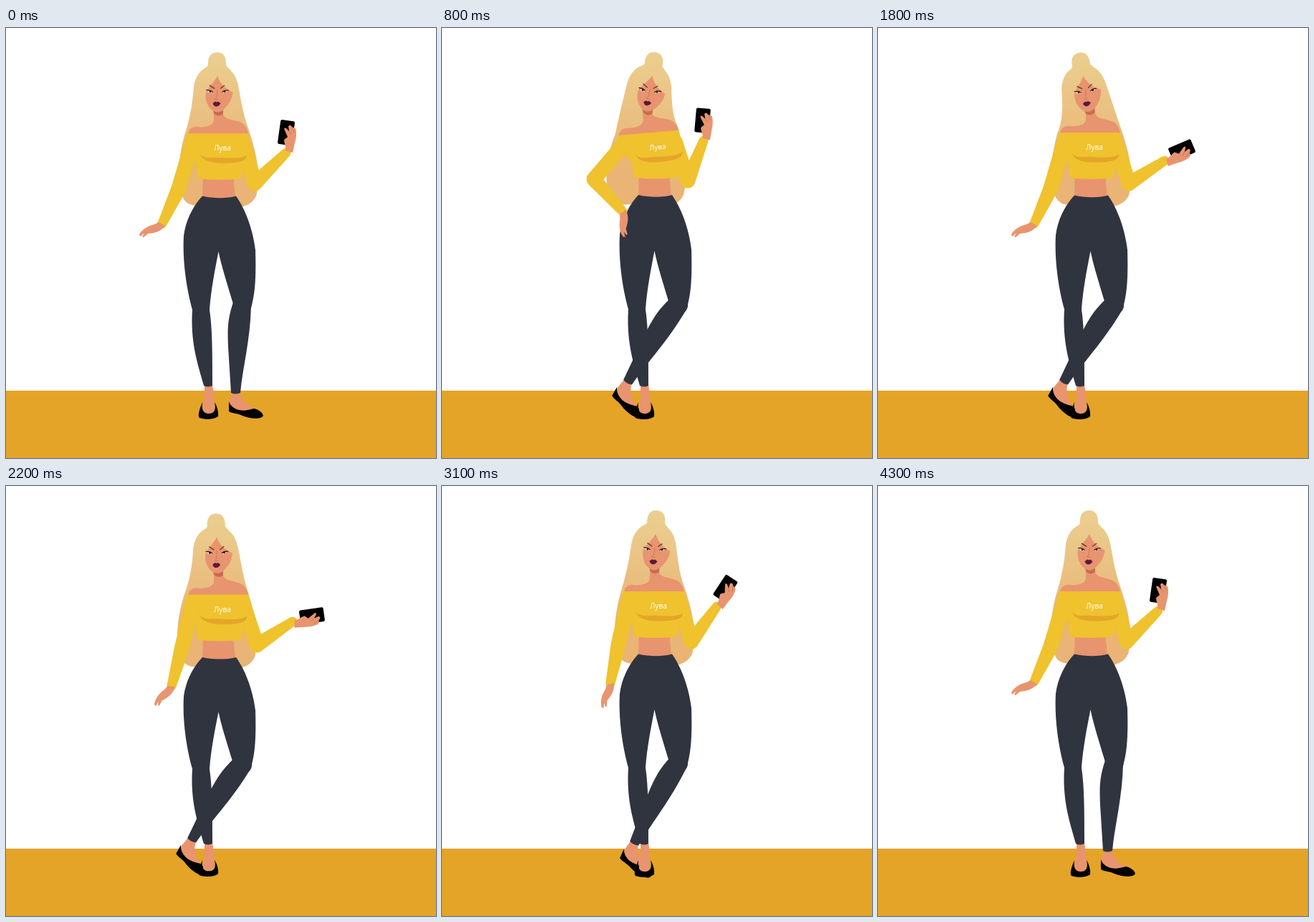
An HTML page that plays this animation: 600x600 px, repeating every 5 s.

```html
<!DOCTYPE html>
<html lang="ru">
<head>
<meta charset="utf-8">
<style>
  html, body { margin: 0; width: 100%; height: 100%; overflow: hidden; background: #fff; }
  svg { display: block; width: 100vw; height: 100vh; }
  .skin { fill: #e8946f; }
  .knit { fill: #efc22e; }
  .pants { fill: #30343f; }
  .hair { fill: url(#blond); }
  text { font: 10px "Noto Sans", "Open Sans", sans-serif; fill: #fff; text-anchor: middle; }
</style>
</head>
<body>
<svg viewBox="0 0 600 600">
  <defs>
    <linearGradient id="blond" gradientUnits="userSpaceOnUse" x1="0" y1="34" x2="0" y2="190">
      <stop offset="0" stop-color="#ebcf90"/>
      <stop offset="1" stop-color="#e9b475"/>
    </linearGradient>
  </defs>
  <rect y="506" width="600" height="94" fill="#e4a428"/>
  <path id="mane" class="hair"/>

  <g id="legs">
    <g id="shin">
      <path class="skin" d="M315 506H326C327 518 336 527 347 531L335 537L318 534L312 523Z"/>
      <path d="M311 521C313 527 318 531 325 533C335 535 341 532 346 531C354 533 358 537 359 541C355 547 340 545 330 541C322 537 316 538 311 535Z"/>
      <path class="pants" d="M318 380C309 405 309 420 310 445L314 509Q320 512 327 509C330 475 341 435 342 388Z"/>
      <circle class="pants" cx="330" cy="387" r="12.500"/>
    </g>
    <path class="skin" d="M277 497H288L290 512C291 525 292 538 283 541C274 541 273 532 277 518Z"/>
    <path d="M274 522C270 532 267 541 270 544C279 547 291 546 296 542C297 535 294 527 291 522C293 531 292 538 283 538C274 538 273 531 274 522Z"/>
    <path class="skin" d="M275 205H317L320 238H274Z"/>
    <path class="pants" d="M274 234.500C290 238 308 238 321 234.500C336 256 345 285 348 310C349 345 348 370 342 390L317 385C308 355 300 330 296.500 312C292 335 286 365 284 393C288 420 288 455 288 499Q282 502 276 499C268 470 257 440 260 393C252 365 246 325 248 290C251 265 264 245 274 234.500Z"/>
  </g>

  <path id="neck" class="skin" d="M254 148C255 141 260 137 268 138C280 139 290 136 290 128V110H303V121C306 128 318 128 326 131C333 134 337 140 338 148Z"/>
  <path id="top" class="knit"/>
  <path id="leftArm" class="knit"/>
  <path id="rightArm" class="knit"/>
  <g id="leftHand">
    <path class="skin" d="M4 3C-3 12 -12 13 -20 14L-26 19L-28 18L-25 13L-31 18L-32 15C-28 8 -20 3 -11 1L-5 -2Z"/>
  </g>
  <g id="rightHand">
    <rect x="-10" y="-45" width="20" height="34" rx="2" transform="rotate(8 0 -28)"/>
    <path class="skin" d="M-1 -3C0 -9 -3 -13 -3 -18L2 -22L-2 -31Q-4 -36 0 -34L4 -30L3 -37Q6 -40 8 -36L13 -34C15 -28 14 -20 12 -14L9 0Z"/>
    <path d="M4 -30L7 -25M8 -36L11 -28" fill="none" stroke="#b9694c" stroke-width=".7"/>
  </g>
  <g id="chest">
    <path fill="#e4a628" d="M269 173C274 184 285 180 300 181C318 182 330 182 336 177C336 186 326 188 305 188.500C285 189 273 185 269 173Z"/>
    <text x="302" y="171">Лува</text>
  </g>

  <g id="head">
    <path fill="#c66d4d" d="M288 110H303V120C300 123 293 123 290 119Z"/>
    <path class="hair" d="M282 52C281 40 286 34 294.500 34S308 40 307 52L312 58H277Z"/>
    <path class="skin" d="M295 66L281 82C278 90 278 97 280 104C283 111 288 117 295 117.500C301 117 305 113 308 109C313 104 316 97 317 86Z"/>
    <path class="hair" d="M295 67C290 76 284 81 278 91L263 100V82C266 62 276 53 294 52C312 53 321 64 324 82L326 94L318 90C307 86 299 78 295 67Z"/>
    <path d="M284 80L291 84.500M299 84.500L305 80" fill="none" stroke="#7b4027" stroke-width="1.500"/>
    <path d="M281 89Q285 86.500 288 90Q285 91.500 281 89M302 90Q305 86 308 88.500Q305 91.500 302 90" fill="#fff"/>
    <path d="M279 86.500Q285 86 288.500 89.500M301.500 89.500Q305 86 311 87" fill="none" stroke="#191313" stroke-width="1.100"/>
    <g fill="#24191a"><circle cx="285" cy="88.800" r="1.500"/><circle cx="305" cy="88.500" r="1.500"/></g>
    <path d="M295 86L294 97L291 99L296 100" fill="none" stroke="#c8704f" stroke-width=".7"/>
    <path fill="#5b1a3b" d="M288.500 105L292 102.500L294 103.500L296 102.500L299.500 105Q297 109.500 293.500 109.500T288.500 105Z"/>
  </g>
</svg>
<script>
const el = id => document.getElementById(id);
const put = (id, name, value) => el(id).setAttribute(name, value);

// lean, head: degrees; drop: hip sink; sway: hair ends; cross: 0..1
// arms: elbow x, y, wrist x, y, hand angle
const stand = { lean: 0, head: 0, drop: 0, sway: 0, cross: 0,
  left: [241, 224, 218, 273, 0], right: [347, 217, 391, 174, 0] };
const pose = changes => ({ ...stand, ...changes });
const hip = pose({ lean: -5, head: 8.5, drop: -1.5, sway: -12, cross: 1,
  left: [212, 211, 252, 256, -66], right: [343, 213, 365, 157, -3] });
const reach = pose({ head: -9, drop: -1, sway: 1, cross: 1,
  right: [350, 217, 400, 185, 59] });
const dip = pose({ head: -1, drop: 4.5, sway: -2, cross: 1,
  left: [245, 228, 231, 279, -22], right: [350, 222, 400, 189, 74] });
const look = pose({ head: 4, sway: 1, cross: 1,
  left: [247, 221, 238, 276, -53], right: [348, 217, 382, 167, 30] });
const settle = pose({ sway: -6 });

const steps = [[0, stand], [600, stand], [800, hip], [1200, hip], [1600, reach], [1800, reach],
  [2200, dip], [2400, dip], [2700, look], [3000, look], [3400, settle], [4300, stand], [5000, stand]];

const mix = (a, b, k) => Array.isArray(a) ? a.map((v, i) => mix(v, b[i], k)) : a + (b - a) * k;

function poseAt(time) {
  const i = steps.findIndex(([at]) => at > time);
  const [from, a] = steps[i - 1], [to, b] = steps[i];
  const k = (time - from) / (to - from), eased = k * k * (3 - 2 * k);
  return Object.fromEntries(Object.keys(a).map(key => [key, mix(a[key], b[key], eased)]));
}

function turn([x, y], [cx, cy], degrees) {
  const r = degrees * Math.PI / 180, c = Math.cos(r), s = Math.sin(r);
  return [cx + (x - cx) * c - (y - cy) * s, cy + (x - cx) * s + (y - cy) * c];
}

function bone([ax, ay], ra, [bx, by], rb) {
  const len = Math.hypot(bx - ax, by - ay), nx = (ay - by) / len, ny = (bx - ax) / len;
  return `M${ax + nx * ra} ${ay + ny * ra}L${bx + nx * rb} ${by + ny * rb}` +
    `L${bx - nx * rb} ${by - ny * rb}L${ax - nx * ra} ${ay - ny * ra}Z` +
    `M${bx - rb} ${by}a${rb} ${rb} 0 0 0 ${2 * rb} 0a${rb} ${rb} 0 0 0 ${-2 * rb} 0Z`;
}

function arm(side, shoulder, [ex, ey, wx, wy, angle]) {
  put(side + 'Arm', 'd', bone(shoulder, 10.5, [ex, ey], 10.5) + bone([ex, ey], 10.5, [wx, wy], 6.5));
  put(side + 'Hand', 'transform', `translate(${wx} ${wy}) rotate(${angle})`);
}

function draw(time) {
  const p = poseAt(time), waist = [300, 235];
  const lift = (x, y) => [x, y + p.drop];
  const body = (x, y) => lift(...turn([x, y], waist, p.lean));
  const neck = [297, 122], [nx, ny] = body(...neck);
  const head = (x, y) => {
    const [hx, hy] = turn([x, y], neck, p.head);
    return `${hx + nx - neck[0]} ${hy + ny - neck[1]} `;
  };
  const tip = (x, y, amount = 1) => `${x + p.sway * amount} ${y + p.drop} `;

  put('mane', 'd', 'M' + head(294, 52) + 'C' + head(275, 52) + head(265, 64) + head(262, 82) +
    'C' + head(260, 105) + head(258, 122) + tip(249, 150, .6) +
    'C' + tip(241, 180) + tip(237, 215) + tip(247, 237) + 'C' + tip(251, 246) + tip(262, 250) + tip(275, 247) +
    'L' + tip(325, 250) + 'C' + tip(338, 249) + tip(349, 240) + tip(350, 230) +
    'C' + tip(356, 200) + tip(348, 170) + tip(338, 140, .7) +
    'C' + head(330, 118) + head(327, 95) + head(324, 80) + 'C' + head(320, 62) + head(310, 52) + head(294, 52) + 'Z');
  put('top', 'd', `M${body(253, 147)}L${body(338, 147)}L${body(341, 165)}L${lift(331, 195)}` +
    `L${lift(329, 210)}Q${lift(298, 214)} ${lift(267, 210)}L${lift(265, 190)}L${body(249, 162)}Z`);
  put('head', 'transform', `translate(${nx} ${ny}) rotate(${p.head}) translate(-297 -122)`);
  put('neck', 'transform', `translate(0 ${p.drop}) rotate(${p.lean} ${waist})`);
  put('chest', 'transform', `translate(0 ${p.drop}) rotate(${p.lean} 302 180)`);
  put('legs', 'transform', `translate(0 500) scale(1 ${1 - p.drop / 265}) translate(0 -500)`);
  put('shin', 'transform', `translate(330 387) rotate(${29 * p.cross}) scale(${1 + .05 * p.cross}) translate(-330 -387)`);
  arm('left', body(260, 160), p.left);
  arm('right', body(331, 160), p.right);
}

const start = performance.now();
function tick() {
  const time = (performance.now() - start) % 5000;
  draw(Math.floor(time / 100) * 100);
  requestAnimationFrame(tick);
}
tick();
</script>
</body>
</html>
```
